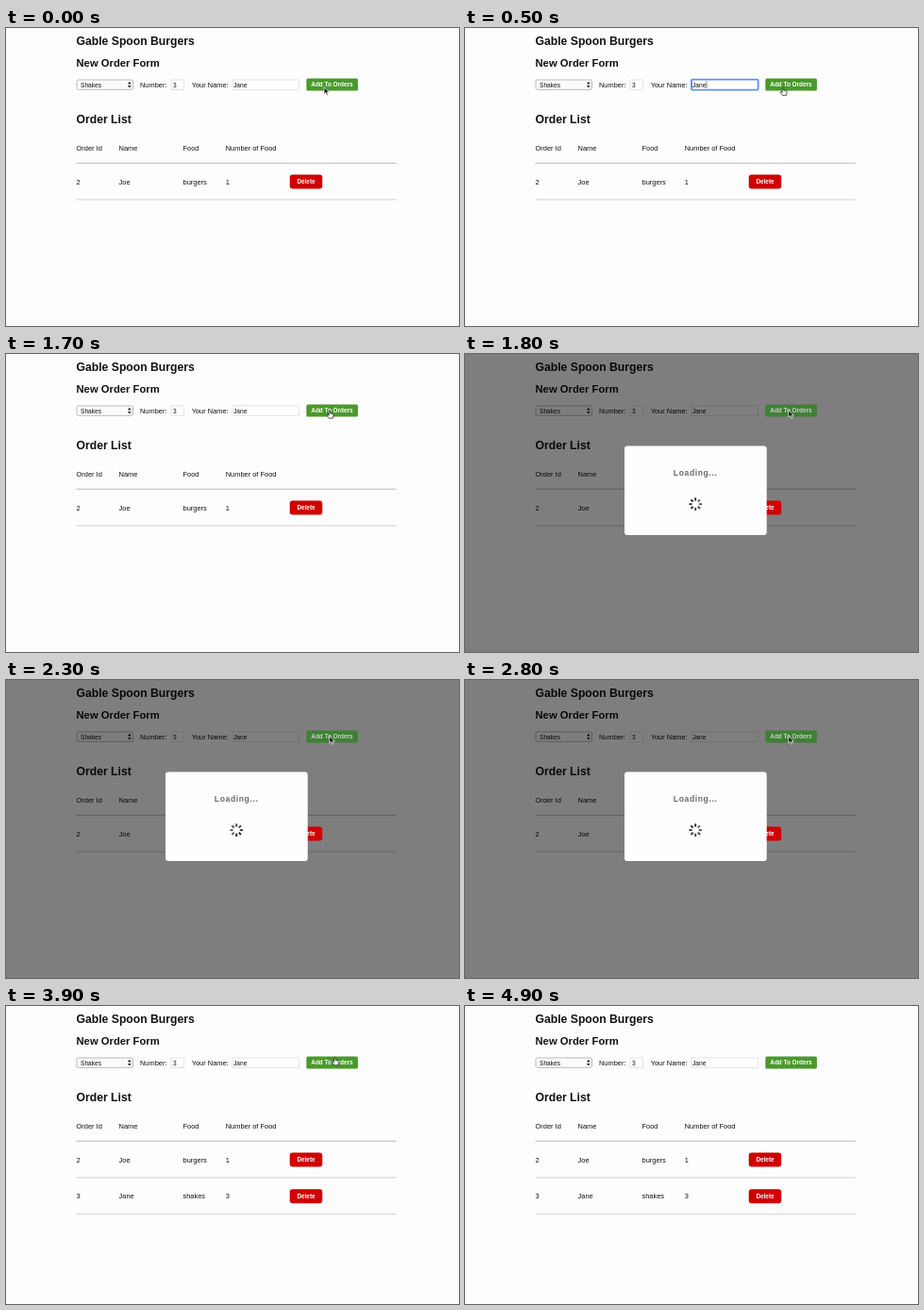
Write an HTML page that moves like this. It is 480 px wide and 316 px high and loops after 5 s.

```html
<!DOCTYPE html>
<html lang="en">
<head>
<meta charset="utf-8">
<title>Order form</title>
<style>
  html, body { margin: 0; width: 100%; height: 100%; overflow: hidden; background: #fdfdfd; }
  svg { display: block; width: 100%; height: 100%; }
  text { font: 7.45px "Liberation Sans", Arial, sans-serif; fill: #111; }
  .title { font-size: 12.2px; font-weight: bold; }
  .subtitle { font-size: 11.25px; font-weight: bold; }
  .field { font-size: 6.6px; }
  .label { font-size: 6.4px; font-weight: bold; fill: #fff; text-anchor: middle; }
  .loading { font-size: 8.6px; font-weight: bold; letter-spacing: .6px; fill: #6a6a6a; }
  .box { fill: #fff; stroke: #ddd; stroke-width: .8; }
  .add { fill: #4a992c; }
  .delete { fill: #d00000; }
  .busy .add { fill: #3f8035; }
  .busy .delete { fill: #b01820; }
  .busy .label { fill: #c8d0c6; }
</style>
</head>
<body>
<svg viewBox="0 0 480 316">
  <defs>
    <g id="delete">
      <rect class="delete" x="300.7" y="155.5" width="34.5" height="15" rx="3"/>
      <text class="label" x="318" y="165.4">Delete</text>
    </g>
  </defs>
  <rect width="480" height="316" fill="#fdfdfd"/>
  <text class="title" x="74.5" y="18.3">Gable Spoon Burgers</text>
  <text class="subtitle" x="74.5" y="41">New Order Form</text>

  <rect x="75" y="55" width="59.5" height="10.3" rx="1.5" fill="#fbfbfb" stroke="#aaa" stroke-width=".8"/>
  <text class="field" x="79" y="62.6">Shakes</text>
  <path d="M129 59.4l1.8-2.6 1.8 2.6zM129 61l1.8 2.6 1.8-2.6z" fill="#222"/>
  <text x="142" y="62.6">Number:</text>
  <rect class="box" x="175" y="55" width="13.7" height="10.3"/>
  <text class="field" x="177" y="62.6">3</text>
  <text x="196.7" y="62.6">Your Name:</text>
  <rect class="box" x="240" y="55" width="70.3" height="10.3"/>
  <rect id="focus" x="240" y="54.6" width="70.6" height="11" rx="1" fill="#fff" stroke="#5f93ee" stroke-width="1.9"/>
  <text class="field" x="241" y="62.6">Jane</text>
  <path id="caret" d="M256 56.5v7.5" stroke="#222" stroke-width=".6"/>

  <text class="title" x="74.5" y="101">Order List</text>
  <g id="table"></g>

  <rect id="shade" width="480" height="316" fill="#000" opacity=".5"/>
  <g id="buttons">
    <rect class="add" x="318.3" y="53.4" width="54.6" height="13.2" rx="1.5"/>
    <text class="label" x="345.4" y="62.4">Add To Orders</text>
    <use href="#delete"/>
    <use id="newDelete" href="#delete" y="38.7"/>
  </g>

  <g id="modal">
    <rect x="169" y="97.5" width="150.7" height="94.5" rx="3" fill="#fefefe"/>
    <text class="loading" x="220.8" y="128.6">Loading...</text>
    <g id="spinner" transform="translate(244.2 159.2)" stroke="#222" stroke-width="1.9"></g>
  </g>

  <g id="cursor" stroke-linejoin="round">
    <path id="arrow" d="M0 0v7.4l1.8-1.6 1.2 2.8 1.3-.6-1.2-2.7h2.5z" fill="#111" stroke="#fff" stroke-width=".7"/>
    <path id="hand" d="M-.7 .6Q0-.5 .7 .6V3.2L3.6 4Q4.3 4.3 4.2 5.2L3.5 8.6H-.6L-3 5.4Q-2.8 4.3-1.8 4.8L-.7 5.6Z" fill="#fff" stroke="#111" stroke-width=".7"/>
  </g>
</svg>
<script>
const $ = id => document.getElementById(id);
const show = (id, on) => $(id).setAttribute('visibility', on ? 'visible' : 'hidden');

const columns = [74.5, 119.6, 187.5, 232.7];
const row = (cells, y, lineY, color) =>
  cells.map((cell, i) => `<text x="${columns[i]}" y="${y}">${cell}</text>`).join('') +
  `<path d="M74.5 ${lineY}H413.7" stroke="${color}"/>`;

$('table').innerHTML =
  row(['Order Id', 'Name', 'Food', 'Number of Food'], 130, 143.3, '#bbb') +
  row(['2', 'Joe', 'burgers', '1'], 165.7, 182, '#d0d0d0') +
  `<g id="newRow">${row(['3', 'Jane', 'shakes', '3'], 204.4, 220.8, '#d0d0d0')}</g>`;

const SPOKES = 8;
$('spinner').innerHTML = Array.from({ length: SPOKES }, (_, i) =>
  `<path d="M0-3.6V-6.8" transform="rotate(${i * 360 / SPOKES})"/>`).join('');

// Pointer stops: time, x, y
const stops = [[0, 337, 62.8], [600, 337, 62.8], [1000, 340.3, 60.5], [1200, 342.8, 59.6],
               [3700, 342.8, 59.6], [4000, 351, 51.5]];

function pointerAt(t) {
  const i = stops.findIndex(s => s[0] > t);
  if (i < 0) return stops.at(-1).slice(1);
  const [t0, x0, y0] = stops[i - 1], [t1, x1, y1] = stops[i];
  const k = (t - t0) / (t1 - t0);
  return [x0 + (x1 - x0) * k, y0 + (y1 - y0) * k];
}

function draw(now) {
  const t = Math.floor(now % 5000 / 100) * 100;
  const busy = t >= 1800 && t < 2900;
  const added = t >= 2900;
  const focused = t >= 300 && t < 1600;

  show('focus', focused);
  show('caret', focused && (t - 300) % 1000 < 500);
  show('shade', busy);
  show('modal', busy);
  show('newRow', added);
  show('newDelete', added);
  $('buttons').setAttribute('class', busy ? 'busy' : '');

  [...$('spinner').children].forEach((spoke, i) => {
    const age = (Math.floor((t - 1800) / 1000 * SPOKES) - i + 4 * SPOKES) % SPOKES;
    spoke.setAttribute('opacity', 1 - age * .04);
  });

  const [x, y] = pointerAt(t);
  const hand = t >= 300 && !busy && y > 53;
  const visible = t < 4100;
  $('cursor').setAttribute('transform', `translate(${x} ${y})`);
  show('hand', visible && hand);
  show('arrow', visible && !hand);
}

const start = performance.now();
(function tick() {
  draw(performance.now() - start);
  requestAnimationFrame(tick);
})();
</script>
</body>
</html>
```
